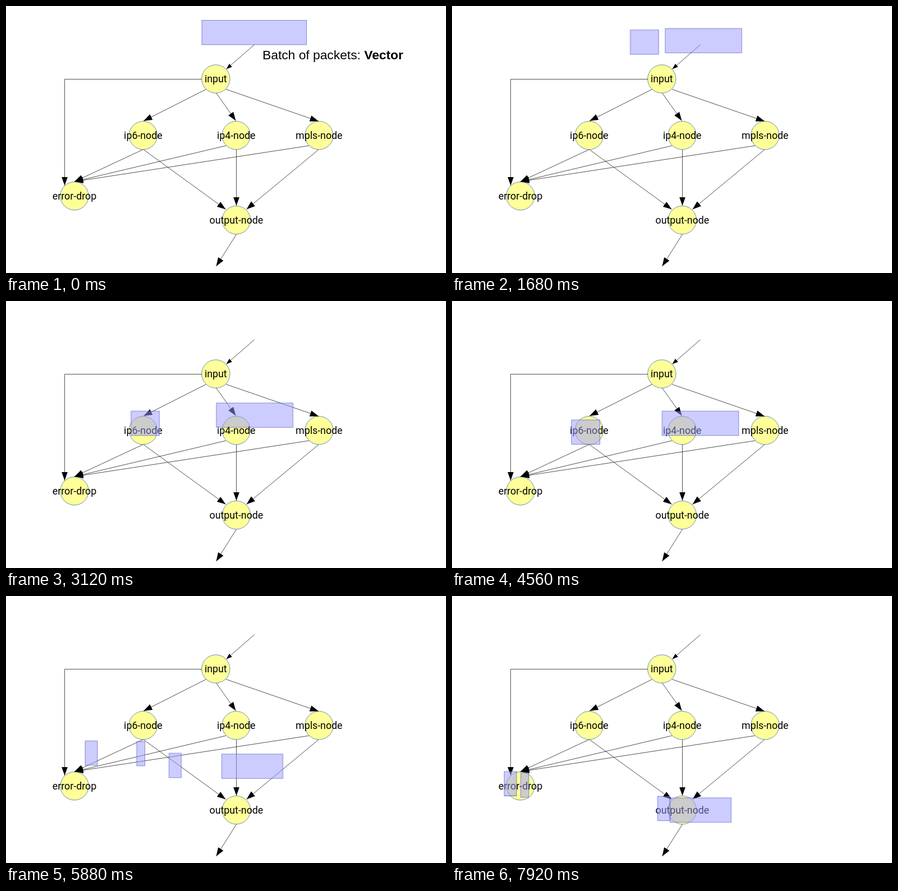
Recreate the animation shown at these times as an HTML page. Size 784 by 476 pixels, loop 8.04 s.

```html
<!DOCTYPE html>
<html lang="en">
<head>
<meta charset="utf-8">
<title>Packet graph</title>
<style>
  html, body { margin: 0; width: 100%; height: 100%; overflow: hidden; background: #fff; }
  svg { display: block; width: 784px; height: 476px; }
  .edge { fill: none; stroke: #222; stroke-width: .8; }
  .node { fill: #ff9; stroke: #5b83b5; stroke-width: .9; }
  .label { font: 17.8px Roboto, sans-serif; text-anchor: middle; }
  .title { font: 22.8px "Liberation Sans", Arial, sans-serif; }
  .bold { font-weight: bold; }
  .box { fill: rgba(153, 153, 255, .5); stroke: rgba(50, 60, 170, .55); stroke-width: 1; }

  .batch, .split, .forward { animation: 8040ms infinite; }
  .batch { animation-name: show-batch; animation-timing-function: step-end; }
  .split { animation-name: show-split, move-split; animation-timing-function: step-end, linear; }
  .forward { animation-name: show-forward, move-forward; animation-timing-function: step-end, linear; }

  @keyframes show-batch { 0% { opacity: 1 } 13.4%, 100% { opacity: 0 } }
  @keyframes show-split { 0% { opacity: 0 } 13.4% { opacity: 1 } 57.2%, 100% { opacity: 0 } }
  @keyframes show-forward { 0% { opacity: 0 } 57.2%, 100% { opacity: 1 } }

  /* Splitting runs 1100-3630 ms, forwarding 4600-7840 ms. */
  @keyframes move-split {
    0%, 13.68% { transform: translate(var(--from)); animation-timing-function: ease-in-out; }
    45.15%, 100% { transform: translate(var(--to)); }
  }
  @keyframes move-forward {
    0%, 57.21% { transform: translate(var(--from)); animation-timing-function: cubic-bezier(.25, 0, .45, 1); }
    97.51%, 100% { transform: translate(var(--to)); }
  }
</style>
</head>
<body>
<svg viewBox="0 0 784 476">
  <defs>
    <marker id="head" markerUnits="userSpaceOnUse" markerWidth="16" markerHeight="12" refX="15.5" refY="5.5" orient="auto">
      <path d="M0 0 15.5 5.5 0 11Z"/>
    </marker>
    <marker id="small-head" markerUnits="userSpaceOnUse" markerWidth="11" markerHeight="8" refX="10.5" refY="3.7" orient="auto">
      <path d="M0 0 10.5 3.7 0 7.4Z"/>
    </marker>
  </defs>
  <g id="graph"></g>
  <g class="batch">
    <rect class="box" x="349" y="25.5" width="186.5" height="43.5"/>
    <text class="title" x="457" y="95">Batch of packets: <tspan class="bold">Vector</tspan></text>
  </g>
  <g id="boxes"></g>
</svg>
<script>
  const make = (parent, tag, attrs, text = '') => {
    const el = document.createElementNS('http://www.w3.org/2000/svg', tag);
    for (const key in attrs) el.setAttribute(key, attrs[key]);
    el.textContent = text;
    return parent.appendChild(el);
  };
  const graph = document.getElementById('graph');
  const boxes = document.getElementById('boxes');

  const nodes = [
    ['input', 373.8, 130],
    ['ip6-node', 244.4, 230.7],
    ['ip4-node', 410.2, 230.7],
    ['mpls-node', 557.8, 230.7],
    ['error-drop', 122, 338.7],
    ['output-node', 410.4, 381.6]
  ];
  for (const [, cx, cy] of nodes) make(graph, 'circle', { class: 'node', cx, cy, r: 25.2 });

  const edge = (d, head = 'head') =>
    make(graph, 'path', { class: 'edge', d, 'marker-end': `url(#${head})` });
  edge('M442.5 69 392.5 112.5', 'small-head');
  [
    'M356.5 148.5 245 205',
    'M374.5 155 409.5 204.5',
    'M392 148.5 557 205.5',
    'M349 130.5H104.5V320',
    'M244 256 122 313',
    'M392 249 122 313',
    'M540 249 122 313',
    'M245 256 391.5 362.5',
    'M410.5 256V356',
    'M557 256 428.5 362.5',
    'M410.5 407 374.5 464'
  ].forEach(d => edge(d));

  for (const [name, x, y] of nodes) make(graph, 'text', { class: 'label', x, y: y + 6.3 }, name);

  const movingBox = (phase, width, from, to) => {
    const px = point => point.map(v => v + 'px').join(',');
    make(boxes, 'rect', {
      class: 'box ' + phase, width, height: 43.5,
      style: `--from:${px(from)};--to:${px(to)}`
    });
  };
  movingBox('split', 50.5, [330.5, 22], [213, 212]);
  movingBox('split', 136.5, [380.5, 21], [374.3, 196.3]);
  movingBox('forward', 22, [191.5, 201.2], [93, 312.5]);
  movingBox('forward', 14.5, [349.5, 200], [122.3, 315.5]);
  movingBox('forward', 22, [210.4, 199.5], [366.3, 357]);
  movingBox('forward', 109, [379.9, 199.5], [388.5, 359.8]);
</script>
</body>
</html>
```
